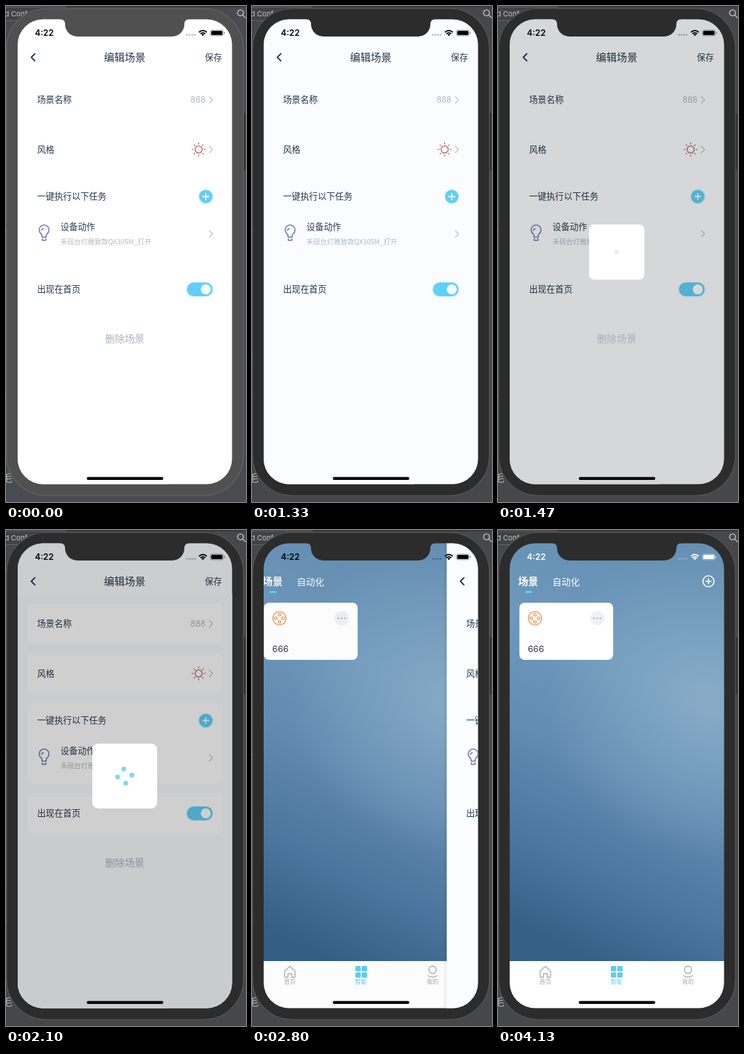
An HTML page for the animation above (4480 ms loop, 370x764 px).

```html
<!DOCTYPE html>
<html lang="zh-CN">
<head>
<meta charset="utf-8">
<title>编辑场景</title>
<style>
html, body { margin: 0; width: 100%; height: 100%; overflow: hidden; background: #3c3d40; }
svg { display: block; width: 100%; height: 100%; }
text { font-family: "Noto Sans CJK SC", "Noto Sans CJK", sans-serif; }
.num { font-family: Inter, sans-serif; }
.label { font-size: 13.35px; font-weight: 500; fill: #24364b; }
.mid { text-anchor: middle; }
.line { fill: none; stroke-linecap: round; stroke-linejoin: round; }
.tab { font-size: 9px; fill: #a3a9b3; text-anchor: middle; }
</style>
</head>
<body>
<svg viewBox="0 0 370 764" preserveAspectRatio="none">
  <defs>
    <clipPath id="screen"><rect x="18" y="20.5" width="330.500" height="716" rx="39"/></clipPath>
    <linearGradient id="sky" x1=".62" y1="0" x2=".38" y2="1">
      <stop offset="0" stop-color="#648fb3"/>
      <stop offset=".3" stop-color="#6e98bb"/>
      <stop offset=".55" stop-color="#628bb2"/>
      <stop offset=".8" stop-color="#4b759d"/>
      <stop offset="1" stop-color="#365f86"/>
    </linearGradient>
    <radialGradient id="haze" gradientUnits="userSpaceOnUse" cx="325" cy="260" r="250">
      <stop offset="0" stop-color="#9dbcd2" stop-opacity=".55"/>
      <stop offset="1" stop-color="#9dbcd2" stop-opacity="0"/>
    </radialGradient>
    <linearGradient id="edge">
      <stop offset="0" stop-color="#000" stop-opacity="0"/>
      <stop offset="1" stop-color="#000" stop-opacity=".22"/>
    </linearGradient>
    <path id="next" class="line" d="M313.5 139.5l5 5-5 5" stroke="#b9bec5" stroke-width="1.2"/>
  </defs>

  <g id="desk">
    <rect id="wall" width="370" height="764"/>
    <rect y="0" width="370" height="2" fill="#38393b"/>
    <rect x="-20" y="1.5" width="114" height="21" rx="4" fill="#414346" stroke="#66686b"/>
    <text class="num" x="-2" y="16" font-size="11" fill="#c4c5c7">d Conf</text>
    <g class="line" stroke="#b5b6b8" stroke-width="1.7"><circle cx="361.500" cy="10.500" r="4.500"/><path d="M365 14l4 4"/></g>
    <rect x="364" y="165" width="5" height="88" fill="#303133"/>
    <text x="-6" y="733" font-size="16" fill="#b0b1b3">毛</text>
    <g class="num" id="code" fill="#a8a9ab" font-size="11"></g>
  </g>
  <rect id="bezel" x="1" y="4" width="365" height="750" rx="61" stroke-width="1.2"/>

  <g clip-path="url(#screen)">
    <g id="home">
      <rect x="18" y="20" width="331" height="645" fill="url(#sky)"/>
      <rect x="18" y="20" width="331" height="645" fill="url(#haze)"/>
      <text x="31" y="85" font-size="15.500" font-weight="700" fill="#fff">场景</text>
      <text x="84" y="84.500" font-size="14" fill="#fff">自动化</text>
      <rect x="41.500" y="94" width="11" height="3" rx="1.500" fill="#5fd3f6"/>
      <g class="line" stroke="#fff" stroke-width="1.700"><circle cx="324.500" cy="79" r="8.500"/><path d="M320.500 79h8M324.500 75v8"/></g>
      <rect x="33" y="112" width="144.500" height="88" rx="8" fill="#fff"/>
      <g class="line" stroke="#e5a670" stroke-width="1.600">
        <circle cx="57" cy="136" r="10.200"/>
        <circle cx="57" cy="130.500" r="2"/><circle cx="57" cy="141.500" r="2"/>
        <circle cx="51.500" cy="136" r="2"/><circle cx="62.500" cy="136" r="2"/>
      </g>
      <circle cx="153" cy="136" r="11" fill="#edf0f6"/>
      <g fill="#b1b9c7"><circle cx="148" cy="136" r="1.400"/><circle cx="153" cy="136" r="1.400"/><circle cx="158" cy="136" r="1.400"/></g>
      <text class="num" x="46" y="187.500" font-size="13.500" fill="#2c3440">666</text>
      <rect x="18" y="664" width="331" height="74" fill="#fff"/>
      <g class="line" stroke="#a3a9b3" stroke-width="1.400">
        <path d="M65 679.500l8-7.500 8 7.500v8q0 1.500-1.500 1.500H76v-5.500h-6v5.500h-3.500q-1.500 0-1.500-1.500z"/>
        <circle cx="293" cy="677.500" r="5.700"/><path d="M286 686.500q7 4.500 14 0"/>
      </g>
      <g fill="#5fccf2">
        <rect x="174" y="671.500" width="8.300" height="8.300" rx="1.500"/><rect x="183.800" y="671.500" width="8.300" height="8.300" rx="1.500"/>
        <rect x="174" y="681.200" width="8.300" height="8.300" rx="1.500"/><rect x="183.800" y="681.200" width="8.300" height="8.300" rx="1.500"/>
      </g>
      <text class="tab" x="73" y="698.500">首页</text>
      <text class="tab" x="182.500" y="698.500" style="fill:#5fccf2">智能</text>
      <text class="tab" x="293" y="698.500">我的</text>
    </g>
    <rect id="shade" x="18" y="20" width="331" height="718"/>

    <g id="page">
      <rect id="edgeShade" x="11" y="20" width="7" height="718" fill="url(#edge)"/>
      <rect id="paper" x="18" y="20" width="331" height="718"/>
      <g id="cards">
        <rect x="18" y="98" width="331" height="640" fill="#f9fafc"/>
        <g fill="#fff">
          <rect x="33" y="113" width="301" height="62" rx="8"/><rect x="33" y="191" width="301" height="61" rx="8"/>
          <rect x="33" y="267" width="301" height="124" rx="8"/><rect x="33" y="405" width="301" height="62" rx="8"/>
        </g>
      </g>
      <path class="line" d="M44.500 73.500L39 79l5.500 5.500" stroke="#222d3a" stroke-width="1.800"/>
      <text class="mid" x="183" y="85" font-size="16" font-weight="500" fill="#24364b">编辑场景</text>
      <text x="306.500" y="84" font-size="13.200" fill="#2c3c50">保存</text>
      <text class="label" x="48" y="149">场景名称</text>
      <text class="num" x="284.500" y="149" font-size="12.400" fill="#b0b4ba">888</text>
      <text class="label" x="48" y="226">风格</text>
      <g class="line" stroke="#bd7472" stroke-width="1.600"><circle cx="297" cy="221" r="5.500"/><path id="rays"/></g>
      <text class="label" x="48" y="298">一键执行以下任务</text>
      <circle cx="308" cy="293.500" r="11.500" fill="#5fd0f7" opacity=".25"/>
      <circle cx="308" cy="293.500" r="10.300" fill="#5fd0f7"/>
      <path class="line" d="M303.500 293.500h9M308 289v9" stroke="#fff" stroke-width="1.800"/>
      <g class="line" stroke="#6c70b5" stroke-width="1.600">
        <path d="M55.500 356v-2.500q0-1.500-1.500-2.700a7.600 7.600 0 1 1 9.500 0q-1.500 1.200-1.500 2.700v2.500zM56 358.500v2.500h5.500v-2.500M54.500 345.500q.8-2 3-2.500"/>
      </g>
      <text x="84" y="345" font-size="13.350" fill="#2c3c50">设备动作</text>
      <text x="84" y="366.500" font-size="10.500" fill="#b3b9c1">禾砚台灯雅致款QX305M_打开</text>
      <use href="#next"/><use href="#next" y="76.500"/><use href="#next" y="206.500"/>
      <text class="label" x="48" y="441">出现在首页</text>
      <rect x="278" y="425" width="41.500" height="23" rx="11.500" fill="#5fd0f7" opacity=".25"/>
      <rect x="279" y="426" width="39.500" height="21" rx="10.500" fill="#5fd0f7"/>
      <circle cx="308" cy="436.500" r="7.700" fill="#fff"/>
      <text id="remove" class="mid" x="183" y="518" font-size="15.200" fill="#a9b3be">删除场景</text>
      <rect id="dim" x="18" y="20" width="331" height="718"/>
      <g id="hud">
        <rect x="-50" y="-50" width="100" height="100" rx="9" fill="#fff"/>
        <g id="dots" fill="#80d8ef"></g>
      </g>
    </g>

    <g id="status">
      <text class="num" x="44.500" y="45.800" font-size="13" font-weight="600">4:22</text>
      <g opacity=".25"><circle cx="279" cy="44.500" r="1.400"/><circle cx="283" cy="44.500" r="1.400"/><circle cx="287" cy="44.500" r="1.400"/><circle cx="291" cy="44.500" r="1.400"/></g>
      <g class="line" stroke="currentColor" stroke-width="1.900" style="stroke-linecap:butt"><path d="M297.500 40.500q6-5.500 12 0M299.800 43q3.700-3.300 7.400 0"/></g>
      <path d="M303.500 46.200l-2.200-2.300q2.200-1.700 4.400 0z"/>
      <rect x="315" y="37" width="20" height="9" rx="2.700" fill="none" stroke="currentColor" stroke-opacity=".4" stroke-width=".9"/>
      <rect x="316.300" y="38.300" width="17.400" height="6.400" rx="1.500"/>
      <path d="M336 40v3q1.400-.3 1.400-1.500t-1.400-1.500z" opacity=".5"/>
    </g>
    <rect x="124.500" y="725.500" width="118" height="4.500" rx="2.250" fill="#000"/>
  </g>
  <path id="notch" d="M82 20q9 0 9 8a19 19 0 0 0 19 19H256a19 19 0 0 0 19-19q0-8 9-8z"/>
</svg>
<script>
const LOOP = 4480, STEP = 70, WIDTH = 331;
const $ = id => document.getElementById(id);
const set = (id, attrs) => { for (const k in attrs) $(id).setAttribute(k, attrs[k]); };
const clamp = x => Math.min(1, Math.max(0, x));
const ramp = (t, start, length) => clamp((t - start) / length);
const ease = x => x < .5 ? 2 * x * x : 1 - 2 * (1 - x) ** 2;
const polar = (r, deg) => [r * Math.cos(deg * Math.PI / 180), r * Math.sin(deg * Math.PI / 180)];

// Critically damped spring: share of the way still to go
function springLeft(t, start) {
  const x = Math.max(0, t - start) * .0146;
  return (1 + x) * Math.exp(-x);
}

$('rays').setAttribute('d', [...Array(8).keys()].map(i => {
  const [a, b] = polar(8.6, i * 45), [c, d] = polar(9.9, i * 45);
  return `M${297 + a} ${221 + b}L${297 + c} ${221 + d}`;
}).join(''));
$('code').innerHTML = [['/', 354], [')', 488], ['=', 550], ['/', 609], ['.', 682]]
  .map(([s, y]) => `<text x="-3" y="${y}">${s}</text>`).join('');
$('dots').innerHTML = '<circle r="3.700"/>'.repeat(4);
const dots = [...$('dots').children];

function draw(t) {
  const active = t >= 1190;
  const bezel = active ? '#2c2c2c' : '#505050';
  set('wall', { fill: active ? '#464749' : '#484b4f' });
  set('bezel', { fill: bezel, stroke: active ? '#58595b' : '#67686a' });
  set('notch', { fill: bezel });

  const left = springLeft(t, 2567.4);
  set('home', { transform: `translate(${-.3 * WIDTH * left})` });
  set('shade', { opacity: .08 * left });
  set('page', { transform: `translate(${WIDTH * (1 - left)})`, visibility: left > .0004 ? 'visible' : 'hidden' });
  set('edgeShade', { opacity: Math.min(1, left * 2) });
  set('paper', { fill: active ? '#fafcfe' : '#fff' });
  set('cards', { opacity: t >= 1680 && t < 2590 ? 1 : 0 });
  set('remove', { opacity: 1 - ramp(t, 1180, 120) + ramp(t, 1370, 160) });

  const open = ease(ramp(t, 1335, 200)) * (1 - ease(ramp(t, 2573, 200)));
  set('dim', { opacity: .19 * open });
  set('hud', {
    transform: `translate(183 379) scale(${.3 + .7 * open})`,
    opacity: clamp(open * 1.5)
  });
  // The two pairs of dots turn slightly out of step
  const spread = 11 * ease(ramp(t, 1400, 320));
  const turn = (t - 2100) / 560;
  const lag = 7.5 * (1 - Math.cos(Math.PI * turn));
  dots.forEach((dot, i) => {
    const [x, y] = polar(spread, -8 + 128 * turn + i * 90 - (i % 2) * lag);
    dot.setAttribute('cx', x);
    dot.setAttribute('cy', y);
  });
  $('dots').setAttribute('opacity', .25 + .75 * ramp(t, 1470, 210));

  const tone = Math.round(255 * ramp(t, 3850, 280));
  set('status', { fill: `rgb(${tone},${tone},${tone})`, color: `rgb(${tone},${tone},${tone})` });
}

const origin = performance.now();
function tick() {
  const t = (performance.now() - origin) % LOOP;
  draw(t - t % STEP);
  requestAnimationFrame(tick);
}
tick();
</script>
</body>
</html>
```
